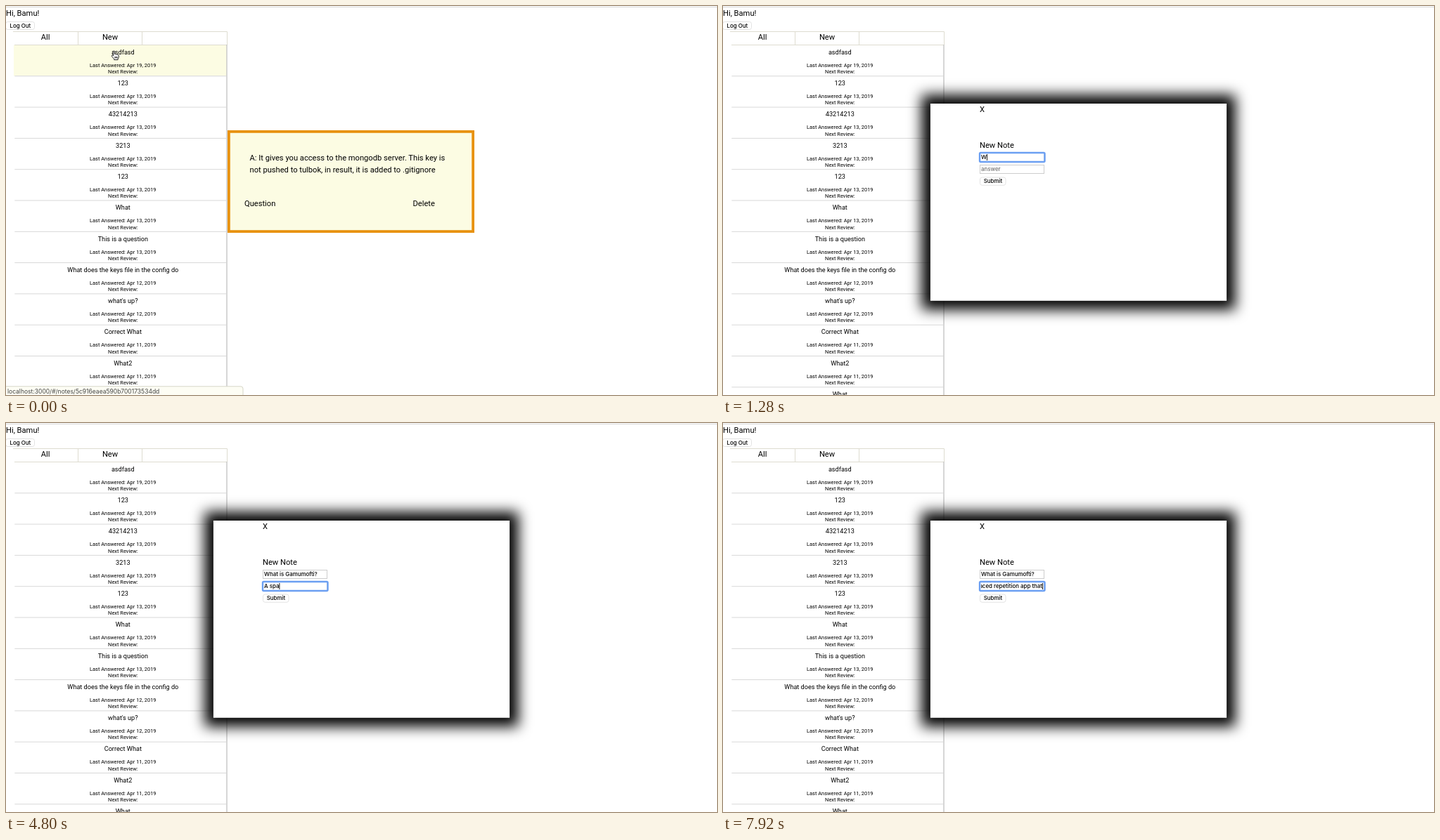
An HTML page that plays this animation: 1011x554 px, repeating every 8000 ms.

```html
<!DOCTYPE html>
<html lang="en">
<head>
<meta charset="utf-8">
<title>Flash card notes</title>
<style>
  html, body { margin: 0; width: 100%; height: 100%; overflow: hidden; background: #fff; }
  svg { display: block; }
  text { font: 400 11.15px Roboto, sans-serif; fill: #000; white-space: pre; }
  .title { font-size: 9.13px; }
  .meta { font-size: 7.45px; }
  .ui { font: 500 7.9px Inter, sans-serif; }
  .url { font: 400 8.5px Inter, sans-serif; fill: #444; }
  .hint { fill: #707070; }
  .mid { text-anchor: middle; }
  .line { fill: none; stroke: #d8d8d8; }
  .tabs { fill: none; stroke: #dedcd0; }
  .cream { fill: #fcfce3; }
  .button { fill: #fff; stroke: #dcdcdc; stroke-width: .8; }
  .field { fill: #fff; stroke: #cdcdcd; }
  .ring { fill: none; stroke: #6b9ff2; stroke-width: 2.4; }
  .shadow { filter: blur(9.5px); }
</style>
</head>
<body>
<svg width="1011" height="554" viewBox="0 0 1011 554">
  <path class="line" d="M0 1.5H1011"/>
  <text x="0" y="14">Hi, Bamu!</text>
  <rect class="button" x="-.5" y="22.5" width="41" height="11" rx="3"/>
  <text class="ui" x="5.5" y="30.9">Log Out</text>

  <rect id="rowHover" class="cream" x="11" y="56" width="303" height="43.5"/>
  <path class="tabs" d="M10 36.5H314.5V55.5H12M102.5 36V55M193.5 36V55"/>
  <g id="tabHover">
    <rect class="cream" x="102" y="37" width="92" height="17"/>
    <path d="M102 54.3H194" stroke="#e8920f" stroke-width="2.6"/>
  </g>
  <text class="mid" x="56" y="48.3">All</text>
  <text class="mid" x="148" y="48.3">New</text>
  <g id="rows"></g>
  <path d="M314 55V554" stroke="#c6c6c6" stroke-width="1.4"/>

  <g id="card">
    <rect class="cream" x="316.9" y="178.9" width="347.2" height="142.2" stroke="#e8920f" stroke-width="3.8"/>
    <text x="346.5" y="220">A: It gives you access to the mongodb server. This key is</text>
    <text x="346.5" y="237">not pushed to tulbok, in result, it is added to .gitignore</text>
    <text x="339" y="284.5">Question</text>
    <text x="578.5" y="284.5">Delete</text>
  </g>

  <g id="status">
    <path d="M-2 556V541.8H334Q337 541.8 337 545V556Z" fill="#fdfdf4" stroke="#d6d6c8"/>
    <text class="url" x="2" y="552">localhost:3000/#/notes/5c916eaea590b700173534dd</text>
  </g>

  <g id="modal">
    <rect class="shadow" x="282.5" y="126.5" width="446" height="306"/>
    <rect x="294.9" y="139" width="421.2" height="280.8" fill="#fff"/>
    <text x="365" y="151">X</text>
    <text x="365" y="202">New Note</text>
    <g id="fields"></g>
    <rect class="button" x="365.5" y="244" width="36.5" height="11.3" rx="3"/>
    <text class="ui" x="370.7" y="252.4">Submit</text>
  </g>

  <circle id="click" r="21.5" fill="none" stroke="#111" stroke-width="1.3"/>
  <g id="pointer" stroke-linejoin="round">
    <path id="hand" fill="#fff" stroke="#111" stroke-width=".9" d="M-1 7V1Q-1 0 0 0T1 1V4.5Q2.3 3.6 3 4.8Q4.3 4.2 5 5.4Q6.8 5.2 6.8 6.8V9L5.6 11V12.6H.2V11.4L-3.2 7.6Q-3.4 6-2.2 6.2ZM1.4 8V10.5M3 8V10.5M4.6 8V10.5"/>
    <path id="arrow" stroke="#fff" stroke-width=".8" d="M0 0V11L2.6 8.6 4.2 12.3 5.8 11.6 4.2 8H7.8Z"/>
    <path id="beam" fill="none" stroke="#222" stroke-width=".9" d="M-2-6Q0-6 0-4.5Q0-6 2-6M0-5V5M-2 6Q0 6 0 4.5Q0 6 2 6"/>
  </g>
</svg>
<script>
const LOOP = 8000, STEP = 80;
const $ = id => document.getElementById(id);
const show = (node, on) => node.style.display = on ? '' : 'none';
const between = (t, a, b) => t >= a && t < b;

const notes = [
  ['asdfasd', 19], ['123', 13], ['43214213', 13], ['3213', 13], ['123', 13], ['What', 13],
  ['This is a question', 13], ['What does the keys file in the config do', 12],
  ["what's up?", 12], ['Correct What', 11], ['What2', 11], ['What', 11],
];
$('rows').innerHTML = notes.map(([title, day], i) => `
  <g class="mid" transform="translate(166.3 ${55.5 + 44.3 * i})">
    <text class="title" y="13.3">${title}</text>
    <text class="meta" y="31.3">Last Answered: Apr ${day}, 2019</text>
    <text class="meta" y="40.5">Next Review:</text>
    <path class="line" d="M-154 44.3H147"/>
  </g>`).join('');

// Each burst is a start time and the characters typed one per step.
const question = [[1280, 'What is'], [1760, ' '], [1920, 'G'], [2080, 'am'], [2320, 'um'],
  [2560, 'ofti'], [3120, '?']];
const answer = [[4400, 'A '], [4720, 'sp'], [4800, 'a'], [5040, 'c'], [5360, 'ed'], [5600, ' r'],
  [5840, 'ep'], [6160, 'e'], [6400, 'tition app '], [7280, 'tha'], [7440, 't']];
const caretOff = [[3680, 3920], [4160, 4400], [7680, 7920]];

const typed = (bursts, t) => bursts.map(([start, chars]) =>
  chars.slice(0, Math.max(0, Math.floor((t - start) / STEP) + 1))).join('');

function makeField(y, hint, bursts, from, to) {
  const g = document.createElementNS('http://www.w3.org/2000/svg', 'g');
  g.setAttribute('transform', `translate(365 ${y})`);
  g.innerHTML = `<rect class="field" x=".5" y=".5" width="91" height="12"/>
    <rect class="ring" x="0" y="0" width="92.5" height="13" rx="1.5"/>
    <svg x="2" width="88.5" height="13"><text class="ui" y="9.3"></text>
    <path d="M.5 2V11" stroke="#000" stroke-width=".9"/></svg>`;
  $('fields').append(g);
  const ring = g.querySelector('.ring'), label = g.querySelector('text'), caret = g.querySelector('path');
  return t => {
    const value = typed(bursts, t), focused = between(t, from, to);
    label.textContent = value || hint;
    label.classList.toggle('hint', !value);
    const width = value ? label.getComputedTextLength() : 0;
    const shift = Math.min(0, 87 - width);
    label.setAttribute('x', shift);
    caret.setAttribute('transform', `translate(${width + shift} 0)`);
    show(ring, focused);
    show(caret, focused && !caretOff.some(([a, b]) => between(t, a, b)));
  };
}
const fields = [
  makeField(209, 'Question', question, 1040, 3440),
  makeField(226, 'answer', answer, 3440, LOOP),
];

const ease = (t, a, b) => {
  const p = Math.min(1, Math.max(0, (t - a) / (b - a)));
  return p * p * (3 - 2 * p);
};

function draw(t) {
  const up = ease(t, 0, 240), across = ease(t, 560, 960);
  const x = 153.5 + 257.5 * across, y = 64 - 18 * up + 167 * across;
  const onTab = y < 56 && x < 194, onField = across === 1;
  const place = `translate(${x} ${y})`;
  $('pointer').setAttribute('transform', place);
  $('click').setAttribute('transform', place);
  show($('pointer'), t < 1280);
  show($('hand'), !across);
  show($('arrow'), across && !onField);
  show($('beam'), onField);
  show($('click'), between(t, 320, 400) || between(t, 960, 1040));
  show($('rowHover'), y >= 56 && !across);
  show($('tabHover'), onTab);
  show($('status'), t < 240);
  show($('modal'), t >= 400);
  if (t >= 400) fields.forEach(update => update(t));
}

function tick(now) {
  draw(Math.floor(now % LOOP / STEP) * STEP);
  requestAnimationFrame(tick);
}
requestAnimationFrame(tick);
</script>
</body>
</html>
```
